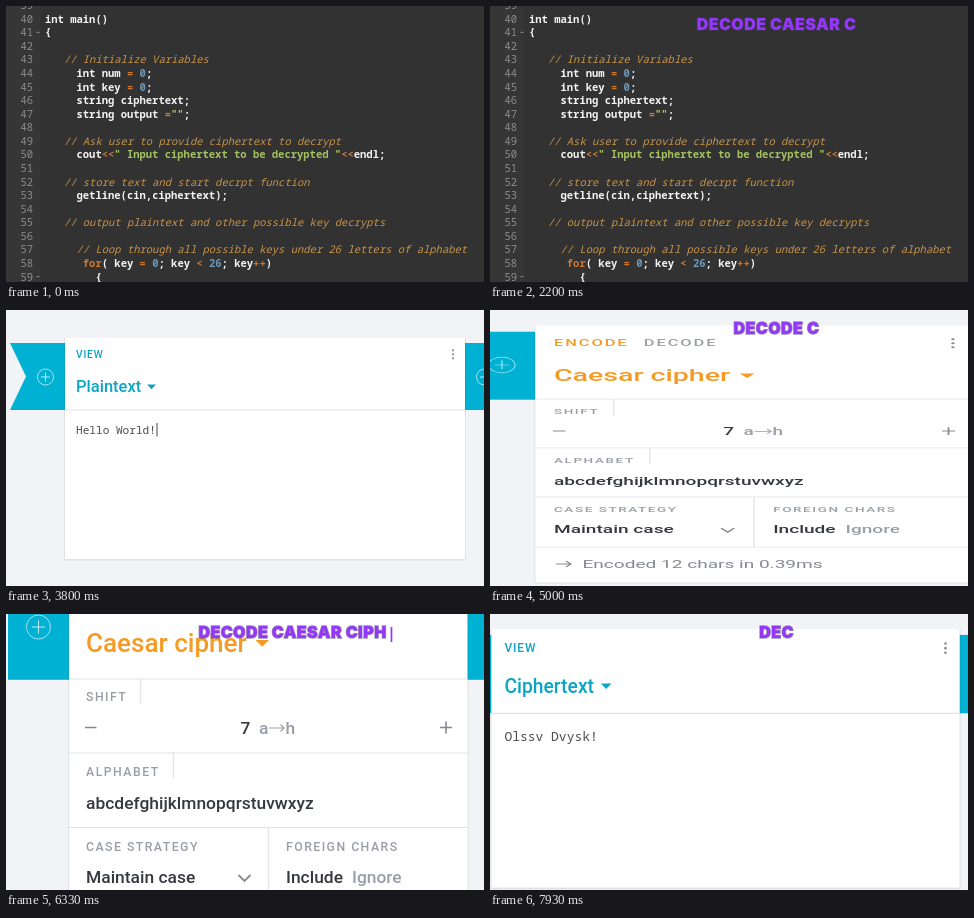
Animation of 478x276 px, one loop 8000 ms. Source, as an HTML page:

```html
<!DOCTYPE html>
<html lang="en">
<head>
<meta charset="utf-8">
<title>Decode Caesar cipher</title>
<style>
  html, body { margin: 0; width: 100%; height: 100%; overflow: hidden; background: #323232; }
  svg { display: block; width: 100vw; height: 100vh; }
  text { white-space: pre; }
  .code { font: 600 10.5px "Noto Sans Mono", "DejaVu Sans Mono", monospace; fill: #f4f4f4; }
  .code .num { fill: #8d8d8d; font-weight: 400; }
  .comment { fill: #c8934a; font-style: italic; font-weight: 500; }
  .op { fill: #cc7833; }
  .str { fill: #a5c261; }
  .lit { fill: #6c99bb; }
  .ui { font-family: Roboto, "Open Sans", sans-serif; font-weight: 500; }
  .mono { font: 400 11.1px "Noto Sans Mono", "DejaVu Sans Mono", monospace; fill: #4d4d4d; }
  .label { font-size: 12.3px; letter-spacing: 1.45px; fill: #9a9ea6; }
  .tab { font-size: 15px; letter-spacing: 1.75px; fill: #9a9ea6; }
  .value { font-size: 17.4px; fill: #35383d; }
  .title { font: 900 16px Inter, "Open Sans", sans-serif; letter-spacing: .45px; fill: #9437fa;
           text-anchor: middle; stroke: #4a3470; stroke-opacity: .55; stroke-width: 1.3px;
           paint-order: stroke; }
</style>
</head>
<body>
<svg id="stage" viewBox="0 0 478 276" preserveAspectRatio="none"></svg>
<script>
const LOOP = 8000;
const TITLE = "DECODE CAESAR CIPHER";
const TITLE_X = 286.5;
const TITLE_START = 60, TITLE_PERIOD = 11200 / 3;
const FIRST_KEY = 97, KEY_GAP = 143;
const BLINK = TITLE_PERIOD / 8;
const TEAL = "#00b1d3", PAGE = "#f1f3f7", LINE = "#e1e3e8", ORANGE = "#f59a23", MUTED = "#9a9ea6";

const stage = document.getElementById("stage");

function add(parent, tag, attrs = {}, text) {
  const node = document.createElementNS("http://www.w3.org/2000/svg", tag);
  for (const key in attrs) node.setAttribute(key, attrs[key]);
  if (text !== undefined) node.textContent = text;
  parent.append(node);
  return node;
}
const group = (parent, attrs) => add(parent, "g", attrs);
const rect = (g, x, y, width, height, fill) => add(g, "rect", { x, y, width, height, fill });
const write = (g, x, y, text, attrs) => add(g, "text", { x, y, ...attrs }, text);
const path = (g, d, stroke, width = 1) =>
  add(g, "path", { d, stroke, fill: "none", "stroke-width": width });

function plusBadge(g, x, y, r) {
  const arm = r * 0.55;
  add(g, "circle", { cx: x, cy: y, r, fill: "none", stroke: "#a5e3ef" });
  path(g, `M${x - arm} ${y}h${2 * arm}M${x} ${y - arm}v${2 * arm}`, "#c0ecf4");
}

function dots(g, x, y, gap, r) {
  for (const i of [-1, 0, 1]) add(g, "circle", { cx: x, cy: y + i * gap, r, fill: "#85898f" });
}

function card(g, x, y, width, height) {
  rect(g, x - 1, y, width + 2, height + 1.5, "rgba(0,0,0,.07)");
  rect(g, x, y, width, height, "#fff");
}

// Code editor
const codeLines = [
  "", "int main()", "{", "",
  "   // Initialize Variables",
  "     int num = 0;",
  "     int key = 0;",
  "     string ciphertext;",
  '     string output ="";', "",
  "   // Ask user to provide ciphertext to decrypt",
  '     cout<<" Input ciphertext to be decrypted "<<endl;', "",
  "   // store text and start decrpt function",
  "     getline(cin,ciphertext);", "",
  "   // output plaintext and other possible key decrypts", "",
  "     // Loop through all possible keys under 26 letters of alphabet",
  "      for( key = 0; key < 26; key++)",
  "        {"
];

function tokenClass(token) {
  if (token.startsWith("//")) return "comment";
  if (token.startsWith('"')) return "str";
  if (/^\d/.test(token)) return "lit";
  return /^(for$|[<=+])/.test(token) ? "op" : "";
}

function buildEditor() {
  const g = group(stage, { class: "code" });
  rect(g, 0, 0, 478, 276, "#323232");
  rect(g, 0, 0, 34, 276, "#363636");
  codeLines.forEach((line, i) => {
    const y = 3.2 + i * 13.57;
    write(g, 27, y, 39 + i, { class: "num", "text-anchor": "end" });
    if (line.trim() === "{") path(g, `M30.5 ${y - 4}h3`, "#8d8d8d");
    const indent = line.search(/\S|$/);
    const row = write(g, 39 + indent * 6.3, y, "");
    const tokens = line.trim().match(/\/\/.*|"[^"]*"|\bfor\b|\b\d+|[<=+]+|[a-z]+|[^a-z<=+"\d]/gi) || [];
    for (const token of tokens) add(row, "tspan", { class: tokenClass(token) }, token);
  });
  return g;
}

// Viewer card
function buildViewer(name, content, caretX, nameEnd, transform) {
  const g = group(stage, { class: "ui" });
  rect(g, 0, 0, 478, 276, PAGE);
  const view = group(g, { transform });
  add(view, "path", { d: "M4 33H59V100H4L20 66.5Z", fill: TEAL });
  rect(view, 459, 33, 30, 67, TEAL);
  plusBadge(view, 39.5, 67, 8);
  plusBadge(view, 478.5, 67, 8);
  card(view, 59, 28, 400, 221);
  write(view, 70, 48, "VIEW", { "font-size": 10.2, "letter-spacing": 0.8, fill: "#0aa5c4" });
  write(view, 70, 82.3, name, { "font-size": 16.5, fill: "#0aa5c4" });
  add(view, "path", { d: `M${nameEnd + 5.5} 74.5h9l-4.5 4.8z`, fill: "#0aa5c4" });
  dots(view, 447, 44.3, 4, 1.1);
  path(view, "M59 100H459", LINE);
  write(view, 70, 123.8, content, { class: "mono" });
  if (caretX) path(view, `M${caretX} 113v13.5`, "#444");
  return g;
}

// Cipher settings card
function buildCipher(transform) {
  const g = group(stage, { class: "ui" });
  rect(g, 0, 0, 478, 276, PAGE);
  const view = group(g, { transform });
  const label = (x, y, text) => write(view, x, y, text, { class: "label" });
  const value = (x, y, text, muted) =>
    write(view, x, y, text, { class: "value", style: muted ? `fill:${MUTED}` : "" });

  rect(view, 2, -37.5, 61, 103.3, TEAL);
  rect(view, 461, -37.5, 41, 103.3, TEAL);
  plusBadge(view, 32.5, 13, 12);
  card(view, 63, -47.5, 398.5, 391);
  write(view, 80, -16.5, "ENCODE", { class: "tab", style: `fill:${ORANGE}` });
  write(view, 162, -16.5, "DECODE", { class: "tab" });
  dots(view, 444, -20, 6, 1.6);
  write(view, 80, 37.5, "Caesar cipher", { "font-size": 26, fill: ORANGE });
  add(view, "path", { d: "M249.5 26h13.5l-6.75 6.8z", fill: ORANGE });

  path(view, "M63 65H461.5M63 139H461.5M63 213.5H461.5M63 290H461.5M262.5 213V290M134.5 65V90M167.5 139V164", LINE, 1.2);
  label(80, 87.3, "SHIFT");
  path(view, "M79 113.5h11.5M434 113.5h12M440 107.5v12", "#85898f", 1.6);
  value(234.5, 119.5, "7");
  value(253, 119.5, "a", true);
  path(view, "M263 114h15M274.5 110.5l3.7 3.5l-3.7 3.5", MUTED, 1.2);
  value(279.5, 119.5, "h", true);
  label(80, 161.6, "ALPHABET");
  value(80, 195, "abcdefghijklmnopqrstuvwxyz");
  label(80, 236.6, "CASE STRATEGY");
  value(80, 268.5, "Maintain case");
  path(view, "M232.5 261l6 6l6-6", "#85898f", 1.8);
  label(280, 236.6, "FOREIGN CHARS");
  value(280, 268.5, "Include");
  value(346, 268.5, "Ignore", true);
  path(view, "M82 315.5h13.5M91 311l4.5 4.5l-4.5 4.5", "#85898f", 1.5);
  write(view, 106, 321.5, "Encoded 12 chars in 0.39ms",
    { "font-size": 17.4, "font-weight": 400, fill: "#85898f" });
  return g;
}

const scenes = [
  { from: 0, node: buildEditor() },
  { from: 2600, node: buildViewer("Plaintext", "Hello World!", 151, 135.5, "") },
  { from: 4830, node: buildCipher("matrix(1.096 0 0 .658 -23.7 46.4)") },
  { from: 5200, node: buildCipher("") },
  { from: 7725, node: buildViewer("Ciphertext", "Olssv Dvysk!", 0, 147, "translate(-67.5 -17.7) scale(1.17)") }
];

const title = write(stage, TITLE_X, 23.6, "", { class: "title" });
const cursor = rect(stage, 0, 13, 1.7, 15, "#9437fa");

function drawTitle(time) {
  const local = time < TITLE_START ? 0 : (time - TITLE_START) % TITLE_PERIOD;
  const typed = Math.max(0, Math.floor((local - FIRST_KEY) / KEY_GAP) + 1);
  const text = TITLE.slice(0, typed);
  if (title.textContent !== text) title.textContent = text;
  const blinkOn = Math.floor(local / BLINK) % 2 === 1;
  cursor.setAttribute("display", blinkOn ? "inline" : "none");
  if (blinkOn) cursor.setAttribute("x", TITLE_X + title.getComputedTextLength() / 2 + 4);
}

function draw(time) {
  scenes.forEach(({ from, node }, i) => {
    const until = i + 1 < scenes.length ? scenes[i + 1].from : LOOP;
    node.setAttribute("display", time >= from && time < until ? "inline" : "none");
  });
  drawTitle(time);
}

const start = performance.now();
function tick() {
  draw((performance.now() - start) % LOOP);
  requestAnimationFrame(tick);
}
tick();
</script>
</body>
</html>
```
